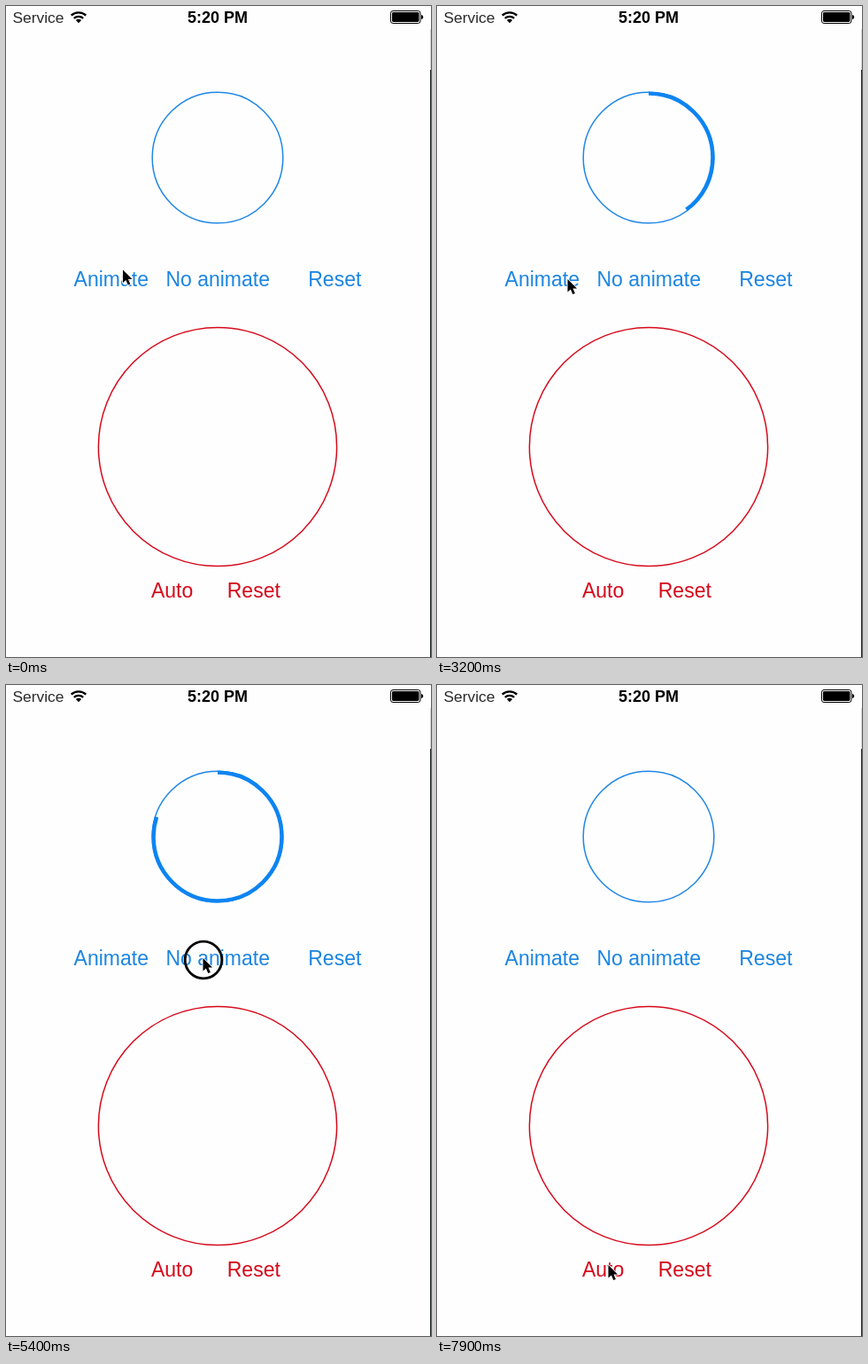
Animation of 480x734 px, one loop 8000 ms. Source, as an HTML page:

```html
<!DOCTYPE html>
<html lang="en">
<head>
<meta charset="utf-8">
<title>Circular progress</title>
<style>
  html, body { margin: 0; width: 100%; height: 100%; overflow: hidden; background: #fefefe; }
  svg { display: block; width: 480px; height: 734px; }
  text { font-family: "Liberation Sans", Arial, sans-serif; }
  .button { font-size: 23px; text-anchor: middle; }
  .blue { fill: #1b85e2; }
  .red { fill: #d60a1c; }
</style>
</head>
<body>
<svg viewBox="0 0 480 734">
  <rect width="480" height="734" fill="#fefefe"/>
  <rect x="479" y="26" width="1" height="46" fill="#d4d4d4"/>
  <rect x="479" y="72" width="1" height="662" fill="#1c2022"/>

  <text x="7.5" y="19" font-size="17.4" fill="#2b2b2b">Service</text>
  <g fill="none" stroke="#000" stroke-width="2.3">
    <path d="M73.7 10.6A12.2 12.2 0 0 1 90.3 10.6"/>
    <path d="M76.8 13.9A7.7 7.7 0 0 1 87.2 13.9"/>
  </g>
  <path d="M82 19.2L78.9 16A4.4 4.4 0 0 1 85.1 16Z"/>
  <text x="239" y="19" font-size="18" font-weight="bold" text-anchor="middle">5:20 PM</text>
  <rect x="434.5" y="5.5" width="33.5" height="14" rx="2.6" fill="none" stroke="#000"/>
  <rect x="436" y="7" width="30.5" height="11" rx="1.4"/>
  <path d="M469 10Q471.2 10.4 471.2 12.5T469 15Z"/>

  <g fill="none">
    <circle cx="239" cy="171" r="73.8" stroke="#1f87e5" stroke-width="1.5"/>
    <circle id="arc" cx="239" cy="171" r="72.4" stroke="#0d84f2" stroke-width="4.4"
      pathLength="100" transform="rotate(-90 239 171)"/>
    <circle cx="239" cy="497" r="134.6" stroke="#d60a1c" stroke-width="1.5"/>
  </g>

  <text class="button blue" id="animate" x="118.8" y="316">Animate</text>
  <text class="button blue" id="jump" x="239.2" y="316">No animate</text>
  <text class="button blue" id="reset" x="371.3" y="316">Reset</text>
  <text class="button red" x="187.6" y="667">Auto</text>
  <text class="button red" x="279.8" y="667">Reset</text>

  <g id="pointer">
    <circle id="ring" cx=".5" cy="2" r="20.8" fill="none" stroke="#000" stroke-width="2.8"/>
    <path d="M0 0V14.6L3.4 11.5L5.8 17L8.4 15.9L6 10.6H10.6Z" stroke="#fff" stroke-width="1.6"
      stroke-linejoin="round" paint-order="stroke"/>
  </g>
</svg>
<script>
  const LOOP = 8000, STEP = 100, FADE = 500;
  const $ = id => document.getElementById(id);
  const arc = $('arc'), ring = $('ring'), pointer = $('pointer');
  const buttons = ['animate', 'jump', 'reset'];

  // Each press is released one step later and moves progress to a new value.
  const clicks = [
    { at: 1000, on: 'animate', to: 0.2, grow: 300 },
    { at: 2300, on: 'animate', to: 0.4, grow: 300 },
    { at: 3400, on: 'jump', to: 0.6, grow: 0 },
    { at: 4400, on: 'jump', to: 0.8, grow: 0 },
    { at: 5400, on: 'jump', to: 1, grow: 0 },
    { at: 6800, on: 'reset', to: 0, grow: 0 }
  ];

  // time, x, y
  const path = [
    [0, 132, 297.5], [400, 134, 304], [600, 134, 304], [900, 135.5, 308],
    [2700, 135.5, 308], [2900, 147.5, 308], [3200, 147.5, 308], [3400, 222.5, 308],
    [5700, 222.5, 308], [6100, 249.5, 295], [6500, 369, 304], [7100, 369, 304],
    [7600, 207, 588], [7700, 190, 652], [7800, 190, 652], [7900, 193.5, 654], [8000, 193.5, 654]
  ];

  const mix = (a, b, k) => a + (b - a) * k;
  const clamp = k => Math.min(1, Math.max(0, k));

  function pointerAt(t) {
    const i = path.findIndex(p => p[0] > t);
    const a = path[i - 1], b = path[i];
    const k = (t - a[0]) / (b[0] - a[0]);
    return [mix(a[1], b[1], k), mix(a[2], b[2], k)];
  }

  function progressAt(t) {
    let value = 0;
    for (const { at, to, grow } of clicks) {
      const since = t - at - STEP;
      if (since >= 0) value = mix(value, to, grow ? clamp(since / grow) : 1);
    }
    return value;
  }

  function alphaAt(t, id) {
    const last = clicks.filter(c => c.on === id && c.at < t).pop();
    return last ? mix(0.2, 1, clamp((t - last.at - STEP) / FADE)) : 1;
  }

  function draw(t) {
    const value = progressAt(t);
    arc.style.display = value ? '' : 'none';
    arc.setAttribute('stroke-dasharray', value < 1 ? `${value * 100} 200` : 'none');
    for (const id of buttons) $(id).style.opacity = alphaAt(t, id);
    ring.style.display = clicks.some(c => t >= c.at && t <= c.at + STEP) ? '' : 'none';
    pointer.setAttribute('transform', `translate(${pointerAt(t)})`);
  }

  const start = performance.now();
  function tick() {
    const t = (performance.now() - start) % LOOP;
    draw(Math.floor(t / STEP) * STEP);
    requestAnimationFrame(tick);
  }
  tick();
</script>
</body>
</html>
```
